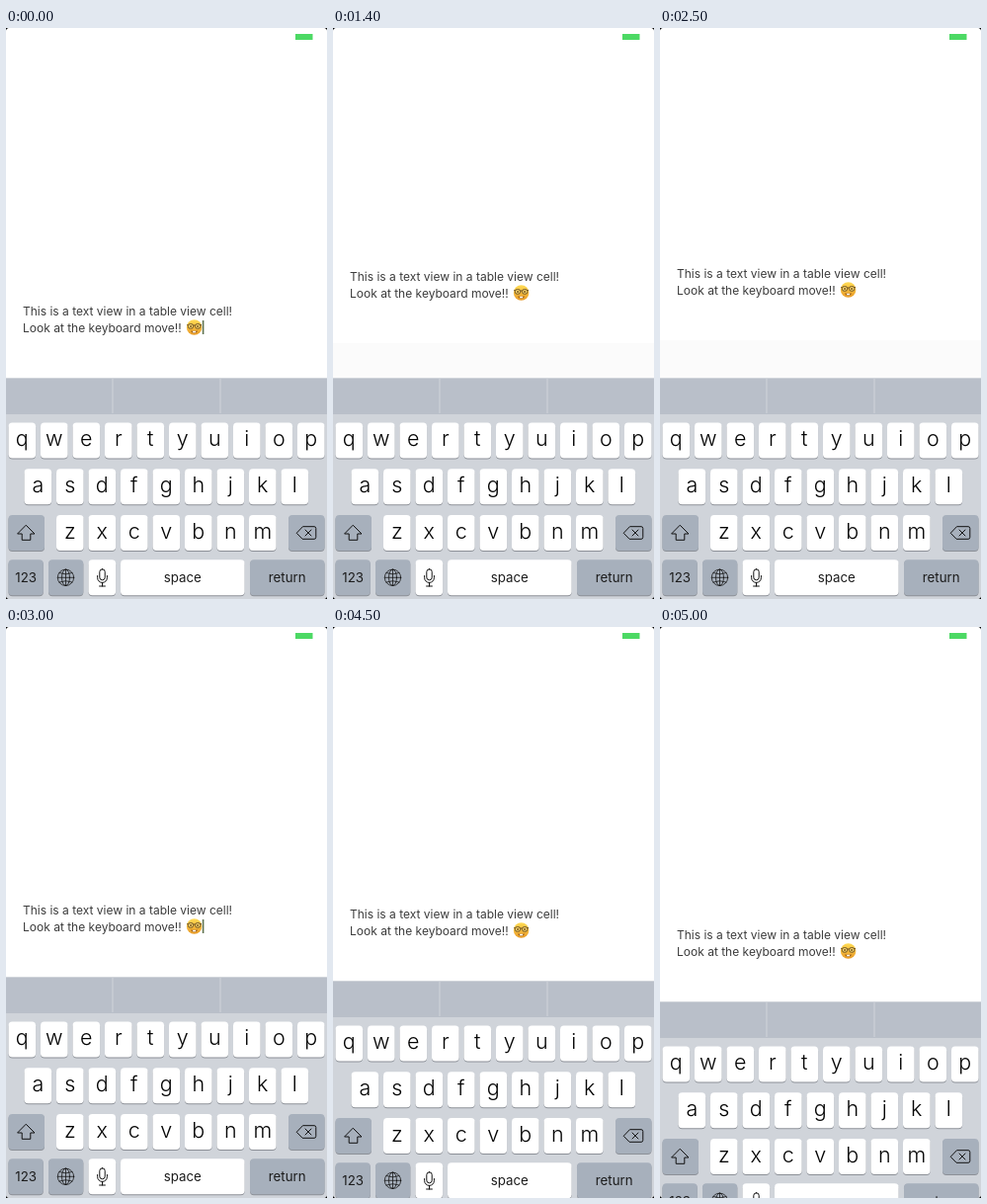
Write an HTML page that moves like this. It is 325 px wide and 578 px high and loops after 5.1 s.

```html
<!DOCTYPE html>
<html lang="en">
<head>
<meta charset="utf-8">
<title>Keyboard and text view</title>
<style>
  html, body { margin: 0; width: 100%; height: 100%; overflow: hidden; background: #000; }
  svg { display: block; width: 100%; height: 100%; }
  .note { font: 400 12px Inter, Roboto, sans-serif; fill: #3c3c3c; }
  .letter { font: 300 21.5px Inter, Roboto, sans-serif; text-anchor: middle; fill: #050505; }
  .label { font: 400 13.3px Inter, Roboto, sans-serif; text-anchor: middle; fill: #1c1c1c; }
  .icon { fill: none; stroke: #111; stroke-width: 1; stroke-linejoin: round; stroke-linecap: round; }
</style>
</head>
<body>
<svg viewBox="0 0 325 578">
  <defs>
    <clipPath id="screen"><rect width="325" height="578" rx="4"/></clipPath>
    <linearGradient id="skin" x2="0" y2="1">
      <stop offset="0" stop-color="#ffdc55"/>
      <stop offset="1" stop-color="#e99a25"/>
    </linearGradient>
  </defs>
  <g clip-path="url(#screen)">
    <rect width="325" height="578" fill="#fbfbfb"/>
    <g id="cell">
      <rect y="-100" width="325" height="454" fill="#fff"/>
      <text class="note" x="17" y="290.5">This is a text view in a table view cell!</text>
      <text class="note" x="17" y="307.7">Look at the keyboard move!!</text>
      <g transform="translate(190.6 303)">
        <circle r="7.8" fill="url(#skin)"/>
        <path d="M-3.6 3.4Q0 4.3 3.6 3.4Q2.8 5.8 0 5.8T-3.6 3.4Z" fill="#945a1c"/>
        <rect x="-1.5" y="3.8" width="3" height="1.5" fill="#fff"/>
        <g fill="#fbd768" stroke="#5d431f" stroke-width=".9">
          <rect x="-6.2" y="-3.4" width="5.2" height="4.6" rx="2"/>
          <rect x="1" y="-3.4" width="5.2" height="4.6" rx="2"/>
          <path d="M-1-2H1M-6.2-2.4H-7.4M6.2-2.4H7.4"/>
        </g>
        <g fill="#6b4a20"><circle cx="-3.5" cy="-1" r=".9"/><circle cx="3.5" cy="-1" r=".9"/></g>
      </g>
      <rect id="caret" x="198.8" y="296" width="1.6" height="14" fill="#5f7350"/>
    </g>
    <rect x="293" y="6" width="17.5" height="6" fill="#4cd964"/>
    <g id="keyboard">
      <rect y="354" width="325" height="224" fill="#d0d4da"/>
      <rect y="354" width="325" height="37" fill="#b9bfc9"/>
      <path d="M0 354.5H325M108 355V390M217 355V390" stroke="#d0d4da"/>
      <g id="keys"></g>
      <g class="icon">
        <path d="M20.5 503.5L29 512H24.8V518.3H16.2V512H12Z"/>
        <path d="M294.5 511L300.5 504.7H312Q313.8 504.7 313.8 506.5V515.5Q313.8 517.3 312 517.3H300.5ZM303 508L309 514M309 508L303 514"/>
        <g stroke-width=".75">
          <circle cx="60.5" cy="556.3" r="8.2"/>
          <ellipse cx="60.5" cy="556.3" rx="4" ry="8.2"/>
          <path d="M52.3 556.3H68.7M60.5 548.1V564.5M54 551.6Q60.5 554.3 67 551.6M54 561Q60.5 558.3 67 561"/>
        </g>
        <rect x="94.8" y="547.8" width="5.4" height="11" rx="2.7"/>
        <path d="M92.6 554.5V556.5A4.9 4.9 0 0 0 102.4 556.5V554.5M97.5 561.5V565M94.6 565H100.4"/>
      </g>
    </g>
  </g>
</svg>
<script>
const $ = id => document.getElementById(id);
const LOOP = 5100, STEP = 100;

const DARK = '#a7b0bc';
const key = (x, y, width, text = '', fill = '#fff', style = 'label') => {
  const cap = (dy, color) =>
    `<rect x="${x}" y="${y + dy}" width="${width}" height="36" rx="4" fill="${color}"/>`;
  const baseline = y + (style === 'letter' ? 23.7 : 22.4);
  return cap(1, '#8c9097') + cap(0, fill) +
    `<text class="${style}" x="${x + width / 2}" y="${baseline}">${text}</text>`;
};
const row = (letters, x, y) =>
  [...letters].map((c, i) => key(x + i * 32.5, y, 27.6, c, '#fff', 'letter')).join('');

$('keys').innerHTML =
  row('qwertyuiop', 2.5, 399.6) + row('asdfghjkl', 18.5, 446.3) + row('zxcvbnm', 51, 493) +
  key(2.5, 493, 36.5, '', DARK) + key(286, 493, 36.5, '', DARK) +
  key(2.5, 538.3, 35.3, '123', DARK) + key(43, 538.3, 35.3, '', DARK) +
  key(83.5, 538.3, 27.6) + key(116, 538.3, 125.6, 'space') +
  key(247, 538.3, 75.5, 'return', DARK);

// Linear interpolation through [time, value] points.
function track(points, t) {
  const i = points.findIndex(p => p[0] > t);
  if (i < 0) return points.at(-1)[1];
  const [t0, a] = points[i - 1], [t1, b] = points[i];
  return a + (b - a) * (t - t0) / (t1 - t0);
}

const pull = [[0, 0], [900, 0], [1000, -2], [1100, -8], [1200, -18], [1400, -35], [1500, -42]];
const secondPull = [[2100, 0], [2200, -3], [2300, -14], [2400, -27], [2500, -38],
  [2700, -52], [2800, -27], [2900, -8], [3000, 0]];
const dismiss = [[3900, 0], [4300, 2], [4500, 4], [4700, 6.5], [4800, 12], [4900, 18], [5000, 25]];
const caretFade = [[0, 1], [200, 0], [300, 0], [500, 1], [3300, 1], [3500, 0], [3700, 0], [3900, 1]];

function offsetAt(t) {
  if (t <= 1500) return track(pull, t);
  if (t <= 2100) {
    const k = (t - 1500) / 80; // critically damped bounce back
    return -42 * (1 + k) * Math.exp(-k);
  }
  return t < 3900 ? track(secondPull, t) : track(dismiss, t);
}

function draw(now) {
  const t = Math.floor(now % LOOP / STEP) * STEP;
  const y = offsetAt(t);
  const scrolling = (t >= 1000 && t < 3000) || t >= 4000;
  $('cell').setAttribute('transform', `translate(0 ${y})`);
  $('keyboard').setAttribute('transform', `translate(0 ${Math.max(0, y)})`);
  $('caret').setAttribute('opacity', scrolling ? 0 : track(caretFade, t));
}

let start;
function tick(now) {
  start ??= now;
  draw(now - start);
  requestAnimationFrame(tick);
}
draw(0);
requestAnimationFrame(tick);
</script>
</body>
</html>
```
